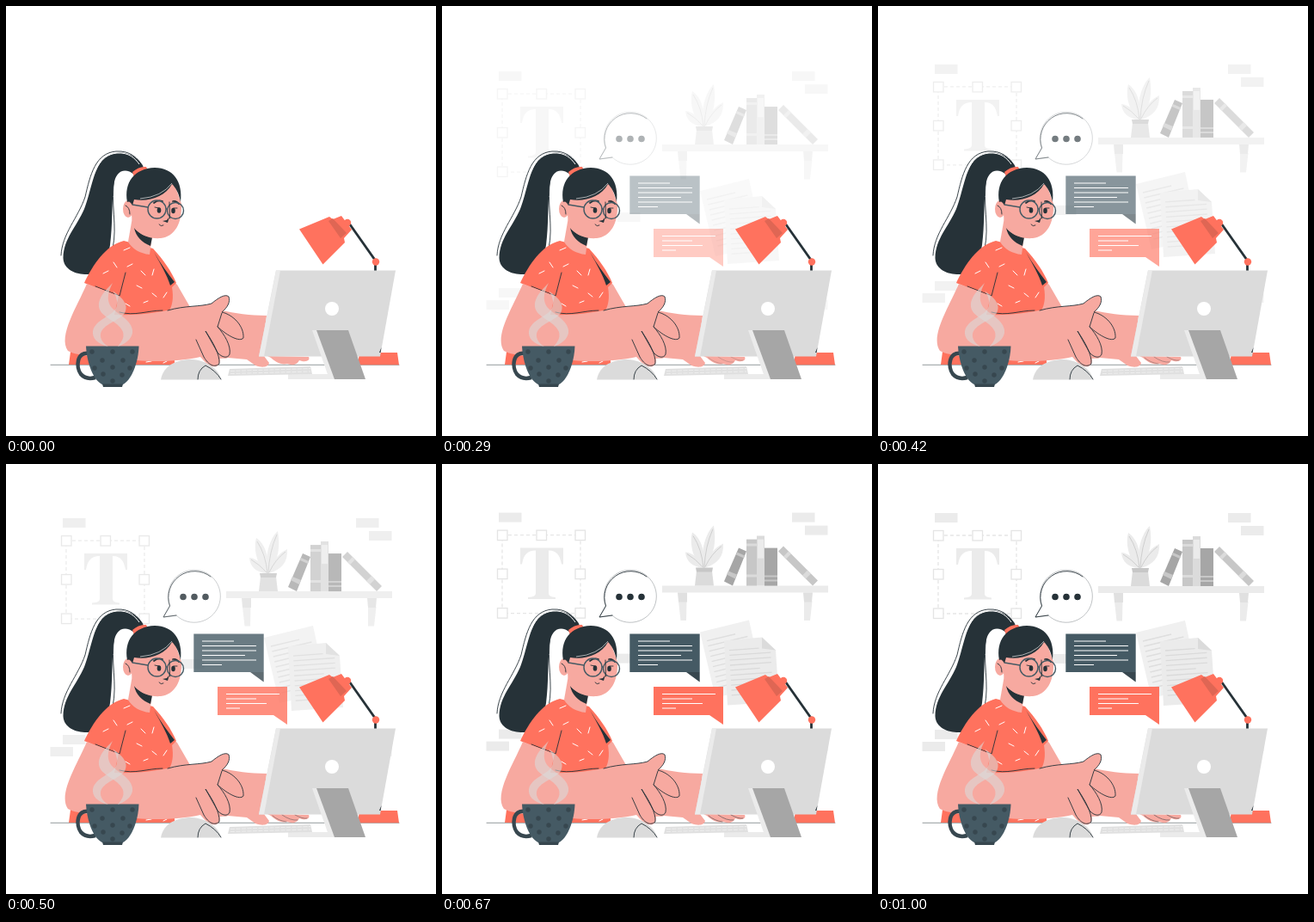
These frames come from a looping animation (500x500 px, 1040 ms). An HTML page:

```html
<!DOCTYPE html>
<html lang="en">
<head>
<meta charset="utf-8">
<title>Designer at work</title>
<style>
html, body { margin: 0; width: 100%; height: 100%; overflow: hidden; background: #fff; }
svg { display: block; width: 100%; height: 100%; }
.line { fill: none; stroke: #263238; stroke-width: .9; stroke-linecap: round; stroke-linejoin: round; }
.thin { stroke-width: .5; }
.bold { stroke-width: 1.8; }
.dark { fill: #263238; }
.skin { fill: #f7a9a0; }
.coral { fill: #ff725e; }
.g1 { fill: #f0f0f0; }
.g2 { fill: #ebebeb; }
.g3 { fill: #dbdbdb; }
.g4 { fill: #c7c7c7; }
.g5 { fill: #a6a6a6; }
</style>
</head>
<body>
<svg viewBox="0 0 500 500">
  <!-- wall: rises and fades in -->
  <g id="wall" opacity="0">
    <g id="bricks" class="g2"></g>

    <path d="M70 83H161V174H70Z" fill="none" stroke="#e6e6e6" stroke-width="1.3" stroke-dasharray="4 3"/>
    <g id="handles" fill="#fff" stroke="#e4e4e4" stroke-width="1.3"></g>
    <path class="g2" d="M91 98H141V117H139C137 106 133 101 124 101V150C124 154 126 155 132 155.500V157.500H100V155.500C107 155 109 154 109 150V101C99 101 95 106 93 117H91Z"/>

    <path class="g2" d="M256 142H449V150H256ZM275 160H284.500L284 182.500H277.500ZM421 160H430.500L428 182.500H421Z"/>
    <path fill="#e0e0e0" d="M274 150H285V161H275ZM420 150H431L430 161H421Z"/>

    <g class="g2" stroke="#c7c7c7" stroke-width=".8">
      <g stroke="none">
        <path d="M304 121C300 101 307 80 316 72C319 91 317 104 306 121Z"/>
        <path d="M303 121C290 109 288 91 291 80C302 87 306 104 305 121Z"/>
        <path d="M306 121C308 109 316 98 327 93C328 108 320 117 306 121Z"/>
        <path d="M303 121C299 110 292 104 283 103C284 114 291 120 303 121Z"/>
      </g>
      <path fill="none" d="M305 121Q306 96 315 76M304 121Q302 99 292 84M306 120Q313 105 325 96M303 120Q295 111 285 105"/>
    </g>
    <path class="g3" d="M296 125H314L316 142H294Z"/>
    <path class="g4" d="M295 121H315L314 126H296Z"/>

    <path class="g5" d="M345 98L354 102L338 142L328 137Z"/>
    <path class="g4" d="M343 103L352 107L351 110L342 106ZM333 125L343 129L341 134L331 129Z"/>
    <path class="g4" d="M354 88H366V142H354Z"/>
    <path class="g3" d="M366 84H375V142H366ZM354 93H366V96H354ZM354 129H366V132H354Z"/>
    <path class="g2" d="M367 88H374V110H367Z"/>
    <path class="g5" d="M375 98H390V142H375Z"/>
    <path class="g4" d="M375 130H390V132H375ZM375 135H390V137H375ZM397 96L437 136L431 142L391 102Z"/>
    <path class="g3" d="M403 102L397 108L400 111L406 105ZM425 124L419 130L423 134L429 128Z"/>

    <path class="g1" d="M300 196L357 182L374 260L318 272Z"/>
    <path id="backText" fill="none" stroke="#dedede" stroke-width="1.5"/>
    <path class="g2" d="M328 206L372 202L388 217L392 277L332 281Z"/>
    <path class="g3" d="M372 202L388 217L372 215Z"/>
    <path id="frontText" fill="none" stroke="#dadada" stroke-width="1.3"/>
  </g>

  <!-- chat: fades in place -->
  <g id="chat" opacity="0">
    <path fill="#455a64" d="M218.300 197.400H299.700V242H218.300Z"/>
    <path fill="#37474f" d="M284 242H299.700V253.500Z"/>
    <path class="coral" d="M246 259H327V292H246ZM311 292H327V303Z"/>
    <path stroke="#fff" stroke-width="1.1" d="M228 206H265M228 211.500H291M228 217H291M228 222.500H278M228 228H291M228 233.500H251M256 267.500H318M256 273H291M256 278.500H303M256 284H272"/>
    <path fill="#fff" stroke="#263238" stroke-width=".3" d="M190.500 165L183 178L198 176A30.500 30.500 0 1 0 190.500 165Z"/>
    <path class="line" d="M238 131A30.500 30.500 0 0 0 190.500 165L183 178L198 176"/>
    <path class="dark" d="M202.200 154.500a3.800 3.800 0 1 0 7.600 0a3.800 3.800 0 1 0-7.600 0M215.200 154.500a3.800 3.800 0 1 0 7.600 0a3.800 3.800 0 1 0-7.600 0M228.200 154.500a3.800 3.800 0 1 0 7.600 0a3.800 3.800 0 1 0-7.600 0"/>
  </g>

  <path class="line thin" d="M52 417.300H457"/>

  <!-- ponytail -->
  <path class="dark" d="M160 188C152 170 129 165 114 177C101 190 99 216 91 236C82 257 67 270 66.500 293C67 308 84 313 97 312C112 310 118 296 121 278C124 255 123 230 125 209C127 192 138 187 149 196Z"/>
  <path class="line" d="M64 290C65 265 84 246 92 222C98 196 104 171 128 169C145 168 153 177 159 186M126 200C121 230 130 255 124 282"/>
  <path fill="none" stroke="#fff" stroke-width="1" d="M93 226C101 194 108 173 129 171C143 170 150 177 155 184"/>
  <path class="coral" d="M147 193Q155 186 163 187L165 191Q156 193 149 199Z"/>

  <!-- far arm and hand -->
  <path class="skin" d="M190 316L199 324L214 350L190 358ZM250 354C266 357 284 360 303 360L297 403L306 415C305 420 298 421 290 418L280 411L258 409L240 411Z"/>
  <path class="skin" d="M304 407L352 408C354 412 349 415 341 412C338 418 332 418 327 416C320 418 312 413 308 409Z"/>
  <path id="fingers" class="line thin" opacity="0" d="M310 409Q317 415 326 416M321 408Q331 415 339 414M336 408Q345 413 350 412"/>

  <!-- torso -->
  <path class="coral" d="M91 322C101 301 116 278 137 273L171 282C183 295 192 308 198 322L193 327C195 339 194 349 188 357L196 412V417H73L76 395L130 338Z"/>
  <path class="skin" d="M148 240L142 274C146 282 156 288 167 289L170 267Z"/>
  <path class="dark" d="M149 258C155 265 162 268 170 269L168 279C158 275 151 268 149 258ZM172 286C180 300 188 311 196 321L191 325C187 312 180 301 172 286Z"/>
  <path class="line" d="M139 310L132 337L104 326M132 356C150 361 164 354 182 354"/>
  <path stroke="#fff" stroke-width="1" stroke-linecap="round" d="M137 284l7-3M125 298l4 6M141 303l6-3M157 308l5 5M170 313l2-7M113 311l6-3M152 325l6 3M170 334l5 4M183 339l4-6M139 346l5 3M160 345l5-2M163 414l6-1M183 415l4-2"/>

  <!-- near arm and hand -->
  <path class="skin" d="M94 323L131 337L126 359C151 360 173 357 192 353C211 348 225 350 239 346C246 340 255 334 259 338C261 344 258 350 251 356C264 359 277 372 276 386C273 391 264 389 255 382C260 392 263 404 258 409C253 411 248 408 246 403C250 409 250 416 245 419C236 421 231 413 226 408C205 413 174 414 152 412C120 411 82 407 72 401C60 384 83 349 94 323Z"/>
  <path class="line" d="M188 354C209 348 225 350 239 346C246 340 255 334 259 338C261 344 258 350 251 356C264 359 277 372 276 386C272 391 258 384 246 373L251 357M246 373C254 382 262 395 260 405C258 410 251 409 246 403L232 378C240 390 249 405 248 416C241 422 234 415 230 408L221 388"/>

  <!-- head -->
  <ellipse class="skin" cx="142" cy="236" rx="6" ry="10"/>
  <path class="skin" d="M146 222C146 239 145 250 150 259C157 267 168 271 180 270C196 268 205 253 204 230L195 205Z"/>
  <path class="dark" d="M141 228C137 205 149 189 173 188C194 188 206 204 203 228C201 217 197 211 193 207C185 222 166 228 149 225L147 232Q144 226 141 228Z"/>
  <path stroke="#fff" stroke-width=".6" fill="none" d="M156 224Q181 222 193 206"/>
  <path class="line" d="M139 232Q144 234 144 242"/>
  <path class="line bold" d="M172 229Q177 225 182 227M194 227Q198 226 201 230"/>
  <g fill="none" stroke="#455a64" stroke-width="1.400">
    <circle cx="175.500" cy="236.500" r="10.500"/>
    <circle cx="197" cy="238" r="9.500"/>
    <path d="M147 231L165 234M186 236L188 236"/>
  </g>
  <ellipse class="dark" cx="178" cy="237.500" rx="2.300" ry="3.200"/>
  <ellipse class="dark" cx="194.500" cy="238" rx="2.300" ry="3.200"/>
  <path class="line" d="M173 234L178 235M195 235L199 235M190 228L190.500 247M178 254Q180 257 183 255"/>
  <path class="dark" d="M190 245L188 252L182 250L187 249Z"/>

  <!-- lamp -->
  <path class="coral" d="M341 259.500L376 245L380 248L390 244L402 260L393 270L394 275L368.500 300.500ZM411 403H455L457 417.300H409Z"/>
  <path fill="#df6654" d="M375 250L380 247L396 264L389 270Z"/>
  <path fill="none" stroke="#263238" stroke-width="2.800" d="M398.500 252L429.500 296V310"/>
  <circle class="coral" cx="397" cy="252" r="4.200"/>
  <circle class="coral" cx="430" cy="297.500" r="4.200"/>

  <!-- computer -->
  <path class="g3" d="M314 307.500H453L435 407.500H294Z"/>
  <path class="g2" d="M314 307.500H319L300 407.500H294Z"/>
  <path class="dark" d="M436.500 397L434 403H435.500Z"/>
  <circle cx="379" cy="352" r="8" fill="#fff"/>
  <path class="g2" d="M328 428H376L379 434H328ZM356 377H362L383 434H376Z"/>
  <path class="g5" d="M361 377H398L418 434H382Z"/>
  <path fill="#e0e0e0" d="M260 422L354 419L356 428L258 430Z"/>
  <path fill="none" stroke="#f2f2f2" stroke-width=".8" stroke-dasharray="5 1.500" d="M261 424.500L354 421.500M261 427.500L354 425"/>
  <path class="g3" d="M180 434.500C183 418 198 411 216 411C234 412 248 423 250 434.500Z"/>
  <path class="line" d="M223 434Q223 423 232 418Q244 424 250 434"/>

  <!-- mug and steam -->
  <path fill="none" stroke="#37474f" stroke-width="4.500" d="M97 404C82 401 81 420 87 428Q93 435 104 432"/>
  <path fill="#455a64" d="M93 395.500H154.500C154 414 146 436 135 440.500H113C101 436 94 414 93 395.500Z"/>
  <path fill="#37474f" d="M112 439.500H136L135 443H113Z"/>
  <g id="dots" fill="#37474f"></g>
  <g fill="#dbdbdb" fill-opacity=".58">
    <path d="M124 322C112 334 104 344 110 355C116 364 132 368 136 379C138 386 134 391 130 396C142 392 148 384 147 377C145 362 124 357 120 346C117 338 120 330 124 322Z"/>
    <path d="M124 331C136 340 143 347 138 357C132 366 112 370 110 381C109 388 114 393 119 396C106 393 100 386 101 378C104 364 124 361 128 351C131 344 128 337 124 331Z"/>
  </g>
</svg>
<script>
const $ = id => document.getElementById(id);
const LOOP = 1040, FPS = 24, RISE = 30;

const rects = (points, w, h) =>
  points.map(([x, y]) => `<rect x="${x}" y="${y}" width="${w}" height="${h}"/>`).join('');

$('bricks').innerHTML = rects(
  [[66, 57], [407, 57], [422, 72], [66, 309], [51.5, 323], [204, 221], [422, 323]], 26.5, 11);
$('handles').innerHTML = rects(
  [[64.5, 77.5], [110, 77.5], [155, 77.5], [64.5, 122.5], [155, 122.5], [64.5, 168], [155, 168]], 11.5, 11.5);
$('dots').innerHTML =
  [[100, 402], [112, 412], [124, 402], [136, 412], [147, 402], [103, 421], [113, 428],
   [124, 420], [135, 429], [144, 421], [124, 436]]
    .map(([x, y]) => `<circle cx="${x}" cy="${y}" r="2.7"/>`).join('');

// Parallel rows of writing on a tilted page
const rows = (count, x, y, dx, dy, w, slope) => Array.from({ length: count }, (_, i) => {
  const len = i % 4 ? w : w * .72;
  return `M${x + i * dx} ${y + i * dy}l${len} ${len * slope}`;
}).join('');
$('backText').setAttribute('d', rows(10, 308, 206, 1.4, 6, 46, -.24));
$('frontText').setAttribute('d', rows(10, 334, 217, .3, 5.8, 48, -.07));

// cubic-bezier(.36, -.01, .5, 1.38), solved by bisection
function ease(x) {
  if (x >= 1) return 1;
  const curve = (s, a, b) => 3 * a * s * (1 - s) ** 2 + 3 * b * s * s * (1 - s) + s ** 3;
  let lo = 0, hi = 1;
  for (let i = 0; i < 24; i++) {
    const mid = (lo + hi) / 2;
    if (curve(mid, .36, .5) < x) lo = mid; else hi = mid;
  }
  return curve(lo, -.01, 1.38);
}

function draw() {
  const step = Math.floor((performance.now() % LOOP + 4) * FPS / 1000);
  const p = step < 3 ? 0 : ease((step + .7) / FPS);
  const alpha = Math.max(0, Math.min(1, p));
  $('wall').setAttribute('transform', `translate(0 ${RISE * (1 - p)})`);
  for (const id of ['wall', 'chat', 'fingers']) $(id).setAttribute('opacity', alpha);
  requestAnimationFrame(draw);
}
draw();
</script>
</body>
</html>
```
